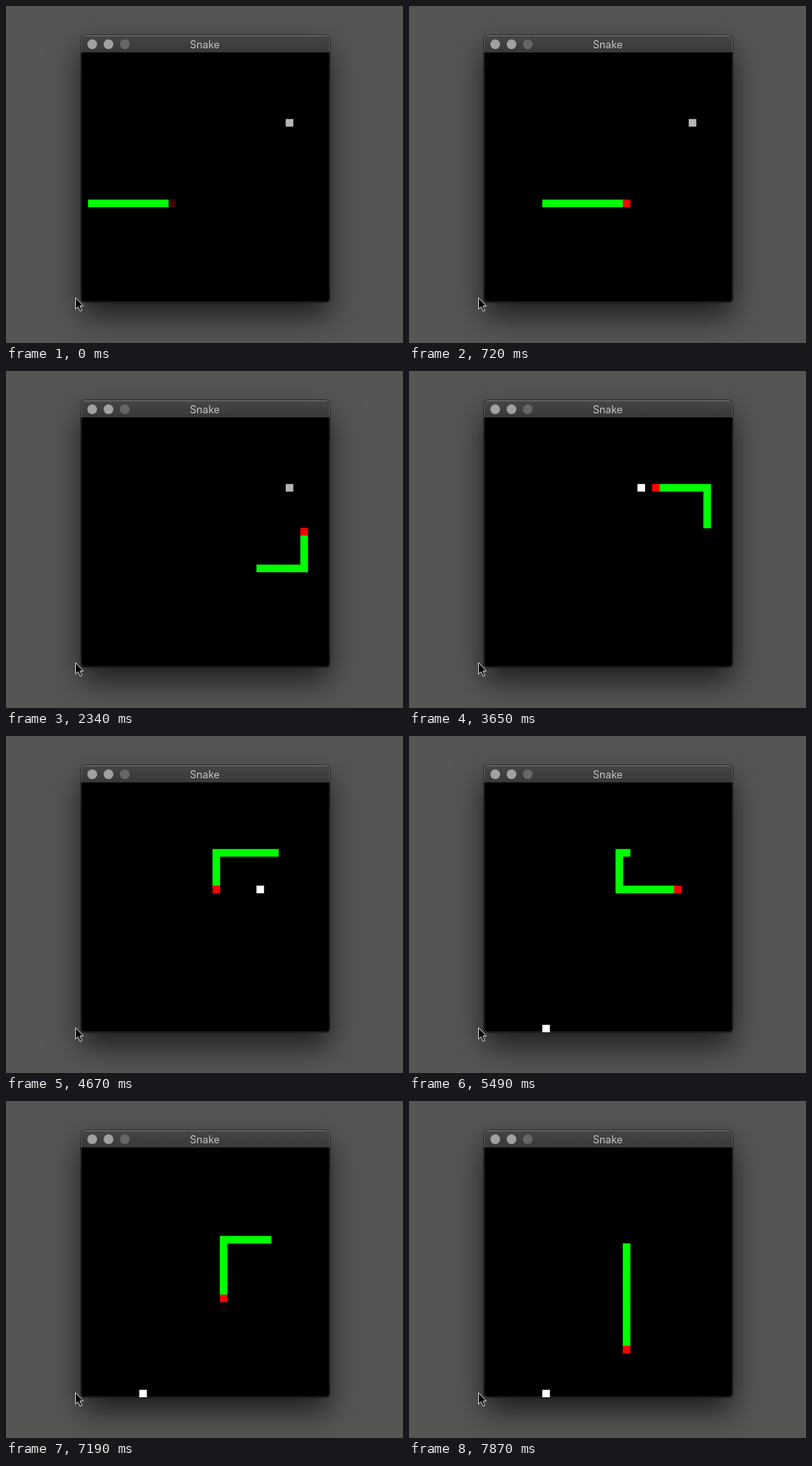
Write an HTML page with a canvas that moves like this. It is 488x414 px and loops after 7990 ms.

```html
<!DOCTYPE html>
<html lang="en">
<head>
<meta charset="utf-8">
<title>Snake</title>
<style>
  html, body { margin: 0; width: 100%; height: 100%; overflow: hidden; background: #555554; }
  .stage { position: relative; width: 488px; height: 414px; overflow: hidden; }
  .window, .shadow {
    position: absolute; left: 92px; top: 36px; width: 306px; height: 328px; border-radius: 5px;
  }
  .window { overflow: hidden; background: #000; }
  .shadow { box-shadow: 0 0 0 1px rgba(0, 0, 0, .4), 0 17px 37px rgba(0, 0, 0, .66); }
  .bar { height: 21px; background: linear-gradient(#464646, #383838); }
  canvas, svg { position: absolute; left: 0; top: 0; }
  .rim {
    position: absolute; inset: 0; border-radius: 5px;
    box-shadow: inset 0 0 0 1px rgba(255, 255, 255, .14), inset 0 1px 0 rgba(255, 255, 255, .12);
  }
  text { font: 12.7px Inter, Roboto, sans-serif; fill: #c2c2c2; text-anchor: middle; }
</style>
</head>
<body>
<div class="stage">
  <div class="shadow"></div>
  <div class="window">
    <div class="bar"></div>
    <canvas id="board" width="306" height="328"></canvas>
    <div class="rim"></div>
  </div>
  <svg width="488" height="414">
    <g fill="#a1a1a1">
      <circle cx="106" cy="47" r="6"/>
      <circle cx="126" cy="47" r="6"/>
      <circle cx="146" cy="47" r="6" fill="#666"/>
    </g>
    <text x="244.3" y="52">Snake</text>
    <path d="M85.5 358.3V372.4L88.6 369.5L91 375L93.3 374L91 368.6H95Z" fill="#000" stroke="#ddd" stroke-width=".9"/>
  </svg>
</div>
<script>
  const LOOP = 7990, STEP = 100.6, CELL = 9, TOP = 22, SOFT = .2, START_LENGTH = 12;
  const ctx = document.getElementById('board').getContext('2d');

  // The snake's route as straight runs from its first tail cell.
  const DIRS = { R: [1, 0], L: [-1, 0], U: [0, -1], D: [0, 1] };
  const path = [[1, 20]];
  for (const run of 'R29 U11 L12 D5 R8 U2 L7 D15'.split(' ')) {
    const [dx, dy] = DIRS[run[0]];
    for (let i = 0; i < +run.slice(1); i++) {
      const [x, y] = path[path.length - 1];
      path.push([x + dx, y + dy]);
    }
  }

  // Foods in the order they are eaten.
  const foods = [[28, 9], [21, 9], [24, 14], [8, 33]];

  // A slight overhang gives each cell a soft edge.
  function drawCell([x, y], color) {
    ctx.fillStyle = color;
    ctx.fillRect(x * CELL - SOFT, TOP + y * CELL - SOFT, CELL + 2 * SOFT, CELL + 2 * SOFT);
  }

  function draw(step) {
    const head = START_LENGTH - 1 + step;
    let eaten = 0;
    for (const [x, y] of path.slice(0, head + 1)) {
      const [fx, fy] = foods[eaten];
      if (x === fx && y === fy) eaten++;
    }
    ctx.clearRect(0, 0, 306, 328);
    drawCell(foods[eaten], eaten ? '#fff' : '#b5b5b5');
    for (let i = step - eaten; i < head; i++) drawCell(path[i], '#0f0');
    drawCell(path[head], step ? '#f00' : '#400000');
  }

  const lastStep = path.length - START_LENGTH;
  const begin = performance.now();
  function tick() {
    const t = (performance.now() - begin) % LOOP;
    draw(Math.min(Math.floor(t / STEP), lastStep));
    requestAnimationFrame(tick);
  }
  tick();
</script>
</body>
</html>
```
